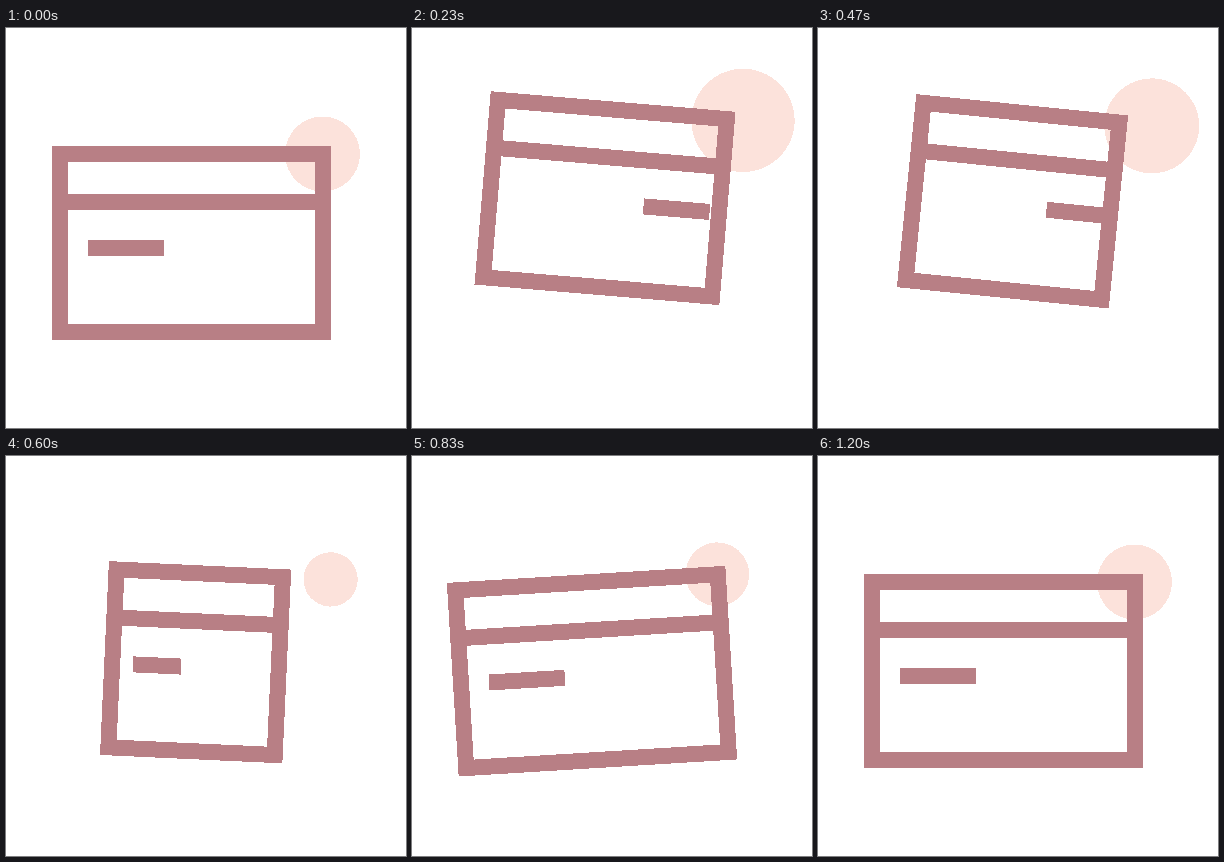
Recreate the animation shown at these times as an HTML page. Size 400x400 px, loop 3.37 s.

```html
<!DOCTYPE html>
<html lang="en">
<head>
<meta charset="utf-8">
<title>Flipping card</title>
<style>
  html, body { margin: 0; width: 100%; height: 100%; overflow: hidden; background: #fff; }
  svg { display: block; width: 100vw; height: 100vh; shape-rendering: crispEdges; }
  #card { fill: none; stroke: #b87f85; stroke-width: 16; }
  #dot { fill: #fce2db; }
</style>
</head>
<body>
<svg viewBox="0 0 400 400">
  <g id="scene">
    <circle id="dot" cx="316.5" cy="126" r="37.5"/>
    <path id="card"/>
  </g>
</svg>
<script>
const LOOP = 3370;
const FPS = 30;
const CX = 185.5;       // card centre line
const HALF = 131.5;     // half width of the card outline
const PIVOT_Y = 305;
const LIFT = 48.2;

const scene = document.getElementById('scene');
const dot = document.getElementById('dot');
const card = document.getElementById('card');

// Eased 0..1 between two times: a cubic bezier with handles at (x1, 0) and (x2, 1).
function ramp(t, from, to, x1 = 1 / 3, x2 = 2 / 3) {
  const x = Math.min(1, Math.max(0, (t - from) / (to - from)));
  if (x === 0 || x === 1) return x;
  let lo = 0, hi = 1;
  for (let i = 0; i < 30; i++) {
    const u = (lo + hi) / 2, v = 1 - u;
    if (3 * x1 * u * v * v + 3 * x2 * u * u * v + u * u * u < x) lo = u;
    else hi = u;
  }
  return lo * lo * (3 - 2 * lo);
}

// Steep ease for the pulsing dot
const pulse = (t, from) => ramp(t, from, from + 10, 0.75, 0.25);

const flipAt = t => ramp(t, 0, 10, 0.29, 0.23) - ramp(t, 10, 20, 0.775, 0.67);

const tiltAt = t => 6.25 * ramp(t, 0, 12, 0.21, 0.49) - 10.25 * ramp(t, 12, 27)
                  + 5.3 * ramp(t, 27, 32) - 1.3 * ramp(t, 32, 36);

const radiusAt = t => 37.5 + 15.5 * pulse(t, 0) - 26.7 * pulse(t, 10) + 11.2 * pulse(t, 20);

function draw(ms) {
  const t = Math.floor(ms * FPS / 1000 + 0.15);
  const flip = flipAt(t);
  const side = 1 - 2 * flip;          // 1 front, -1 back
  const half = HALF * Math.abs(side);
  const left = CX - half, right = CX + half;
  const bar = CX + 8 - 73.5 * side;
  const barHalf = 38 * Math.abs(side);

  card.setAttribute('d',
    `M${left} 126H${right}V304H${left}Z` +
    `M${left} 174H${right}` +
    `M${bar - barHalf} 220H${bar + barHalf}`);
  dot.setAttribute('r', radiusAt(t));
  scene.setAttribute('transform',
    `translate(0 ${-LIFT * flip}) rotate(${tiltAt(t)} ${CX} ${PIVOT_Y})`);
}

const start = performance.now();
function tick() {
  draw((performance.now() - start) % LOOP);
  requestAnimationFrame(tick);
}
tick();
</script>
</body>
</html>
```
